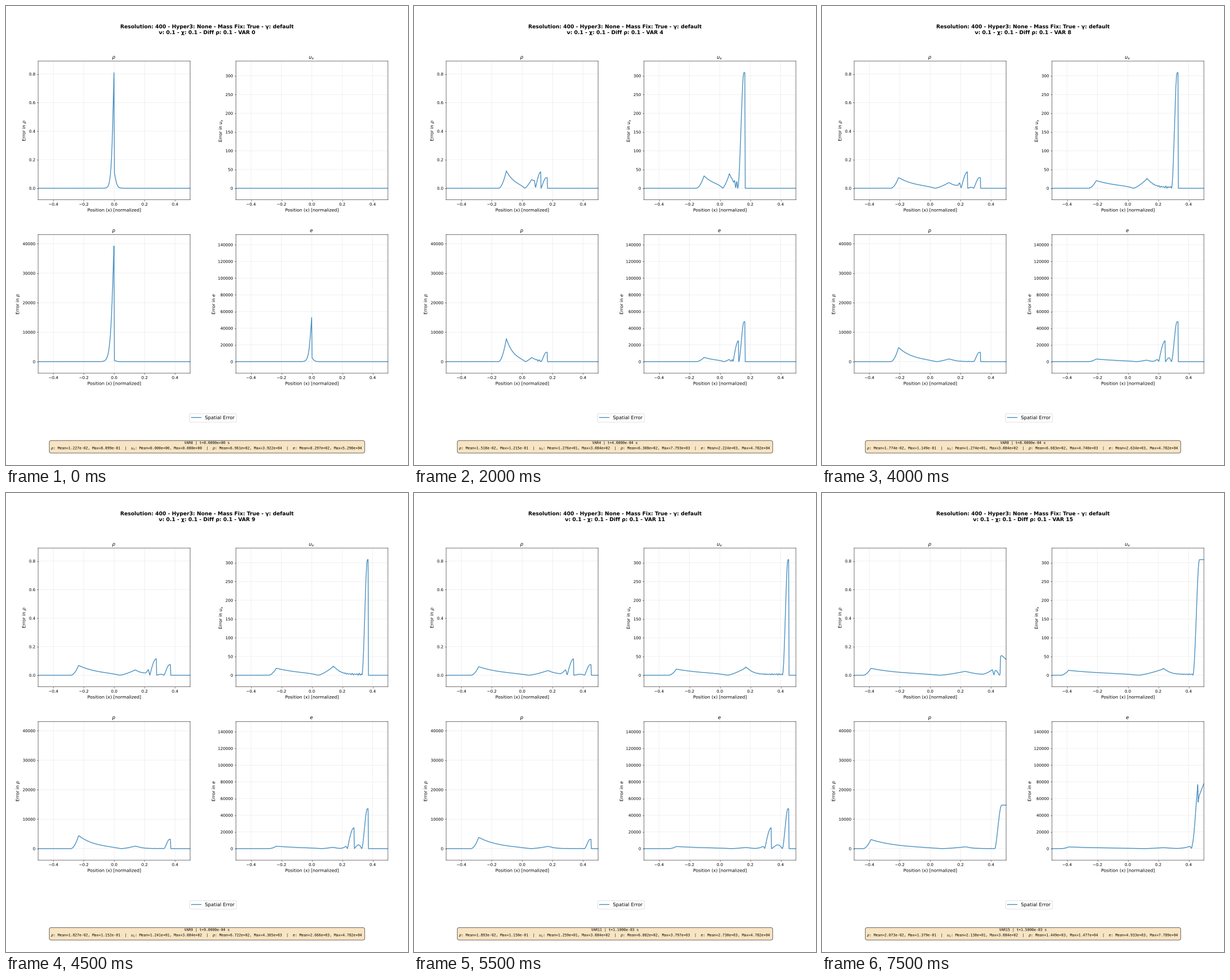
Write a matplotlib script that moves like this. It is 700 px wide and 800 px high and loops after 8000 ms.

```python
import numpy as np
import matplotlib.pyplot as plt
from matplotlib import patheffects
from matplotlib.animation import FuncAnimation

# Text as outlines, free of hinting and pixel rounding
plt.rcParams.update({
    "text.hinting": "none",
    "text.hinting_factor": 32,
    "path.effects": [patheffects.Normal()],
})

FRAMES = 16
WALL_HIT = 13
X = np.linspace(-0.5, 0.5, 400)
LABELS = {"rho": r"$\rho$", "u": "$u_x$", "p": "$p$", "e": "$e$"}
LIMIT = {"rho": 0.8099, "u": 308.4, "p": 39220, "e": 138400}

# Starting spike: height and width left of the jump, height right of it
SPIKE = {"rho": (0.8099, 0.013, 0.11), "u": (0, 1, 0),
         "p": (39220, 0.0176, 400), "e": (52900, 0.0143, 4500)}
# Rarefaction height, its fade rate, speed of the zero behind it,
# middle hump height, shock height, shock steepness
WAVES = {
    "rho": (0.1215, 2.0, 0.0039, 0.060, 0.0745, 1.25),
    "u": (33, 1.5, 0.0045, 36, 308.4, 2.2),
    "p": (7796, 2.5, 0.0050, 1350, 3180, 1.5),
    "e": (5100, 1.5, 0.0068, 2700, 47820, 1.8),
}
# Contact height, bump in front of it, residue behind it
CONTACT = {"rho": (0.1152, 0.04, 0.007), "e": (25000, 2800, 4500)}
RIPPLE = {"rho": 0.003, "u": 10, "p": 350, "e": 0}


def between(a, b):
    return np.clip((X - a) / (b - a), 0, 1)


def swell(t, power=1):
    return np.sin(np.pi / 2 * t) ** power


def initial(name):
    left, width, right = SPIKE[name]
    d = np.abs(X) - np.abs(X).min()
    return np.where(X < 0, left * np.exp(-(d / width) ** 1.25),
                    right * np.exp(-(d / 0.013) ** 1.25))


def ripple(y, a, b, amp):
    """Irregular oscillation growing from a to b, folded at zero."""
    d = X - a
    wave = np.sin(2 * np.pi * d / 0.0155) * (0.7 + 0.5 * np.cos(2 * np.pi * d / 0.043))
    return np.where((X > a) & (X < b), np.abs(y + amp * between(a, b) * wave), y)


def reflected(name, foot, j, power):
    """Wave running back from the wall, j outputs after the hit."""
    past = X - foot
    height = {
        "rho": 0.046 * (1 + j) * (1 - 7 * np.maximum(0, past - 0.045)),
        "u": LIMIT["u"],
        "p": 14770 * min(1, 0.444 * (1 + j)),
        "e": 36700 + 3500 * j + 462000 * past,
    }[name]
    return height * swell(between(foot, foot + 0.035 + 0.005 * j), power)


def profile(name, k):
    if k == 0:
        return initial(name)
    head, fade, speed, top, jump, power = WAVES[name]
    head *= (4 / k) ** 0.7
    top *= (4 / k) ** 0.6

    # All features travel at constant speed
    peak, zero, hump = -0.026 * k, speed * k, 0.0153 * k
    contact, shock = 0.0308 * k, 0.0413 * k
    width = min(0.05, 0.55 * shock, 0.043 + 0.006 * (4 / k) ** 2)
    foot = shock - width
    if name != "u":
        foot = max(foot, contact + 0.0005)
    bounced = k >= WALL_HIT
    if bounced:
        foot = 0.465 - 0.0195 * (k - WALL_HIT)

    t = between(peak, zero)
    parts = [
        (peak, head * between(peak - 0.052, peak) ** 1.9),
        (zero, head * np.exp(-fade * t) * (1 - t ** 8)),
        (hump, top * between(zero, hump) ** 1.4),
    ]
    behind = np.maximum(X - hump, 0)
    ripple_end = foot
    if name in CONTACT:
        high, bump_high, residue = CONTACT[name]
        dip = contact - min(0.043, 0.29 * contact)
        bump = dip - min(0.01, 0.25 * (dip - hump))
        low = top * min(0.9, (5 / k) ** 1.6) if name == "rho" else 0
        tail = low + (top - low) * np.exp(-(behind / (0.32 * (dip - hump))) ** 1.3)
        parts += [
            (bump, np.maximum(tail, bump_high * between(hump, bump) ** 4)),
            (dip, max(low, bump_high) * (1 - between(bump, dip))),
            (contact, high * swell(between(dip, contact))),
            (foot, residue * np.sin(np.pi * between(contact, foot) ** 1.3)),
        ]
        ripple_end = bump
    else:
        scale = min(0.045, 0.6 * (foot - hump))
        parts.append((foot, top * np.exp(-(behind / scale) ** 1.3) + 0.008 * jump))
    if not bounced:
        parts.append((shock, jump * swell(between(foot, foot + 0.86 * (shock - foot)), power)))

    y = np.select([X <= end for end, _ in parts], [v for _, v in parts], 0.0)
    y = ripple(y, hump, ripple_end, RIPPLE[name] * min(1, (4 / k) ** 1.6))
    if bounced:
        wave = reflected(name, foot, k - WALL_HIT, power)
        y = np.abs(y - wave) if name == "rho" else np.where(X > foot, y + wave, y)
        if name == "u":
            y = np.minimum(y, jump)
    return y


def heading(k):
    return ("Resolution: 400 - Hyper3: None - Mass Fix: True - γ: default\n"
            f"ν: 0.1 - χ: 0.1 - Diff ρ: 0.1 - VAR {k}")


def summary(k, curves):
    parts = [f"{LABELS[n]}: Mean={y.mean():.3e}, Max={y.max():.3e}"
             for n, y in curves.items()]
    return f"VAR{k} | t={k * 1e-4:.4e} s\n" + "  |  ".join(parts)


fig, axes = plt.subplots(2, 2, figsize=(14, 16), dpi=50)
fig.subplots_adjust(left=0.08, right=0.95, top=0.88, bottom=0.2, wspace=0.3, hspace=0.25)
title = fig.suptitle(heading(0), fontsize=13, fontweight="bold", y=0.96)

lines = {}
for ax, (name, label) in zip(axes.flat, LABELS.items()):
    lines[name], = ax.plot(X, profile(name, 0), color="#1f77b4", lw=2, alpha=0.8,
                           label="Spatial Error")
    ax.set_title(label, fontsize=12)
    ax.set_xlabel("Position (x) [normalized]", fontsize=11)
    ax.set_ylabel(f"Error in {label}", fontsize=11)
    ax.set_xlim(-0.5, 0.5)
    ax.set_ylim(-0.1 * LIMIT[name], 1.1 * LIMIT[name])
    ax.grid(True, alpha=0.3)

fig.legend(handles=[lines["rho"]], loc="center", bbox_to_anchor=(0.515, 0.1025),
           fontsize=12, borderaxespad=0)
info = fig.text(0.5, 0.03, "", ha="center", va="bottom", fontsize=9, family="monospace",
                bbox=dict(boxstyle="round,pad=0.5", facecolor="wheat", alpha=0.8))


def update(k):
    curves = {name: profile(name, k) for name in LABELS}
    for name, y in curves.items():
        lines[name].set_ydata(y)
    title.set_text(heading(k))
    info.set_text(summary(k, curves))
    return [*lines.values(), title, info]


update(0)
fig.draw_without_rendering()
for artist in fig.findobj():
    artist.set_snap(False)

anim = FuncAnimation(fig, update, frames=FRAMES, interval=500, repeat=True, repeat_delay=0)
plt.show()
```
